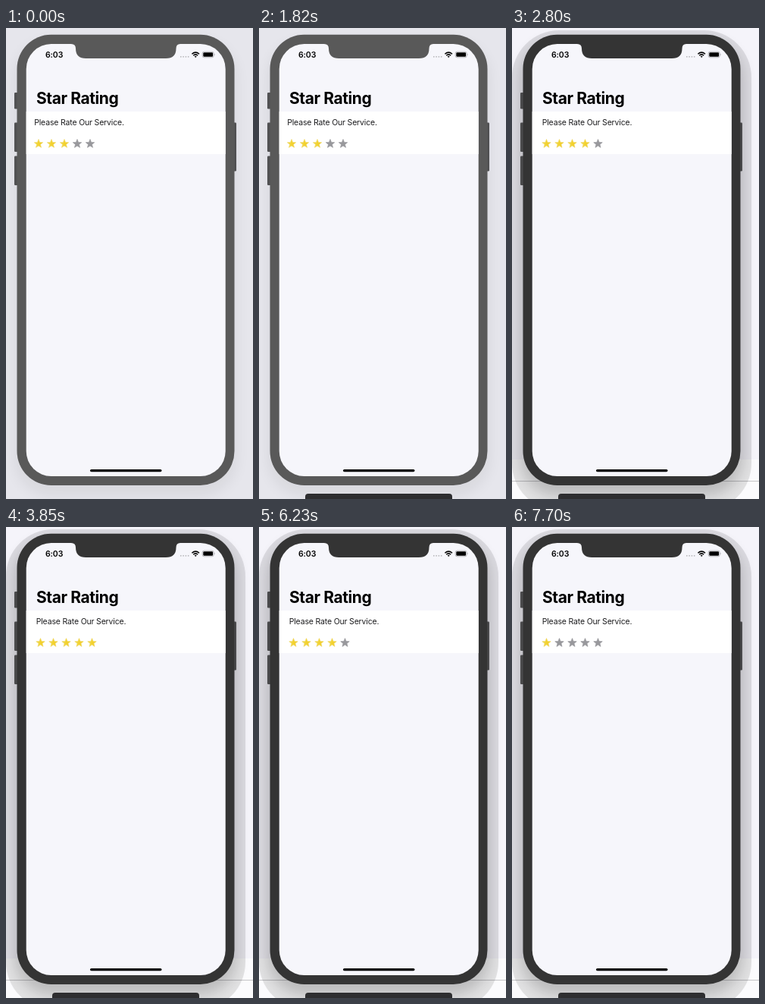
An HTML page that plays this animation: 326x620 px, repeating every 8000 ms.

```html
<!DOCTYPE html>
<html lang="en">
<head>
<meta charset="utf-8">
<title>Star rating</title>
<style>
html, body { margin: 0; width: 100%; height: 100%; overflow: hidden; background: #e4e4ea; }
svg { display: block; width: 326px; height: 620px; }
text { font-family: Inter, Roboto, sans-serif; fill: #000; }
</style>
</head>
<body>
<svg viewBox="0 0 326 620" xmlns="http://www.w3.org/2000/svg">
  <defs>
    <filter id="blur" x="-20%" y="-20%" width="140%" height="140%">
      <feGaussianBlur stdDeviation="9"/>
    </filter>
    <linearGradient id="gold">
      <stop offset="0" stop-color="#eedc5a"/>
      <stop offset=".5" stop-color="#f3d22e"/>
      <stop offset="1" stop-color="#f2cb28"/>
    </linearGradient>
  </defs>

  <rect id="wall" width="326" height="620"/>
  <g id="shelf">
    <rect y="568" width="326" height="52" fill="#fbfbfd"/>
    <rect y="596" width="326" height="1" fill="#c4c4c7"/>
  </g>
  <rect id="halo" x="0" y="3" width="316" height="632" rx="62"/>
  <rect id="shadow" x="11" y="16" width="294" height="600" rx="50" filter="url(#blur)"/>
  <path id="dock" d="M61 620V617Q61 613 65 613H251Q255 613 255 617V620Z" fill="#2e2e30"/>

  <g id="buttons">
    <rect x="11" y="85" width="5" height="21.5" rx="1.3"/>
    <rect x="11" y="124.5" width="5" height="38.5" rx="1.3"/>
    <rect x="11" y="168.5" width="5" height="38.5" rx="1.3"/>
    <rect x="299" y="124.5" width="5" height="64" rx="1.3"/>
  </g>
  <rect id="body" x="14.5" y="8.7" width="287" height="593.3" rx="45"/>
  <rect x="26.7" y="21" width="263" height="569" rx="33" fill="#f6f6fb"/>
  <path id="notch" d="M86 20H230V21Q224.5 21 224.5 27Q224.5 40 211 40H105.5Q92 40 92 27Q92 21 86 21Z"/>

  <text x="52" y="39.2" font-size="10.5" font-weight="600" letter-spacing="-.1">6:03</text>
  <g fill="#b4b4b8">
    <circle cx="230.8" cy="37.8" r=".9"/><circle cx="234.1" cy="37.8" r=".9"/>
    <circle cx="237.4" cy="37.8" r=".9"/><circle cx="240.7" cy="37.8" r=".9"/>
  </g>
  <g fill="none" stroke="#000" stroke-width="1.5">
    <path d="M245.4 34.3Q250.2 29.9 255 34.3"/>
    <path d="M247.2 36.3Q250.2 33.5 253.2 36.3"/>
    <path d="M248.7 37.4Q250.2 36.2 251.7 37.4L250.2 39Z" fill="#000" stroke="none"/>
  </g>
  <rect x="259.2" y="31.2" width="15" height="7.6" rx="2.2" fill="none" stroke="#a0a0a4" stroke-width=".7"/>
  <rect x="260.3" y="32.2" width="12.8" height="5.6" rx="1.2"/>
  <path d="M275 33.7Q276.4 35 275 36.3Z" fill="#a0a0a4"/>

  <text x="39.9" y="99.7" font-size="21" font-weight="700" letter-spacing="-.4">Star Rating</text>
  <rect x="26.7" y="110" width="263" height="56" fill="#fff"/>
  <g id="row">
    <text x="37.2" y="128.2" font-size="10.5" letter-spacing="-.17" style="fill:#1c1c1e">Please Rate Our Service.</text>
    <g id="stars" stroke-width=".7" stroke-linejoin="round"></g>
  </g>
  <rect x="111" y="581" width="94.5" height="3.2" rx="1.6"/>
</svg>
<script>
const LOOP = 8000;
const DOCK_AT = 70;
const DARK_AT = 1890;
const SHELF_AT = 1960;
// [start time, rating]
const RATINGS = [[0, 3], [1960, 4], [3080, 5], [4270, 4], [6300, 2], [7490, 1]];

const el = id => document.getElementById(id);
const set = (id, attrs) => {
  for (const key in attrs) el(id).setAttribute(key, attrs[key]);
};
const clamp = v => Math.min(1, Math.max(0, v));

function starPath(cx, cy, r) {
  const points = [];
  for (let i = 0; i < 10; i++) {
    const a = -Math.PI / 2 + i * Math.PI / 5;
    const d = i % 2 ? r * 0.43 : r;
    points.push((cx + d * Math.cos(a)).toFixed(2) + ' ' + (cy + d * Math.sin(a)).toFixed(2));
  }
  return 'M' + points.join('L') + 'Z';
}

const stars = Array.from({ length: 5 }, (_, i) => {
  const path = document.createElementNS('http://www.w3.org/2000/svg', 'path');
  path.setAttribute('d', starPath(43 + 17 * i, 152.5, 6));
  el('stars').append(path);
  return path;
});

function draw(t) {
  const dark = t >= DARK_AT;
  const shell = dark ? '#343434' : '#595959';
  set('wall', { fill: dark ? '#f5f4fa' : '#e6e6ec' });
  set('halo', { opacity: dark ? 0.1 : 0 });
  set('shadow', { opacity: dark ? 0.17 : 0.055 });
  set('shelf', { opacity: t >= SHELF_AT ? 1 : 0 });
  set('dock', { opacity: clamp((t - DOCK_AT) / 210) });
  set('buttons', { fill: dark ? '#4a4a4c' : '#515153' });
  set('body', { fill: shell });
  set('notch', { fill: shell });
  set('row', { transform: `translate(${dark ? 2.5 : 0} 0)` });

  const rating = RATINGS.filter(r => r[0] <= t).pop()[1];
  stars.forEach((star, i) => {
    const on = i < rating;
    star.setAttribute('fill', on ? 'url(#gold)' : '#98989c');
    star.setAttribute('stroke', on ? '#efd96a' : '#98989c');
  });
}

function tick() {
  draw(performance.now() % LOOP);
  requestAnimationFrame(tick);
}
tick();
</script>
</body>
</html>
```
